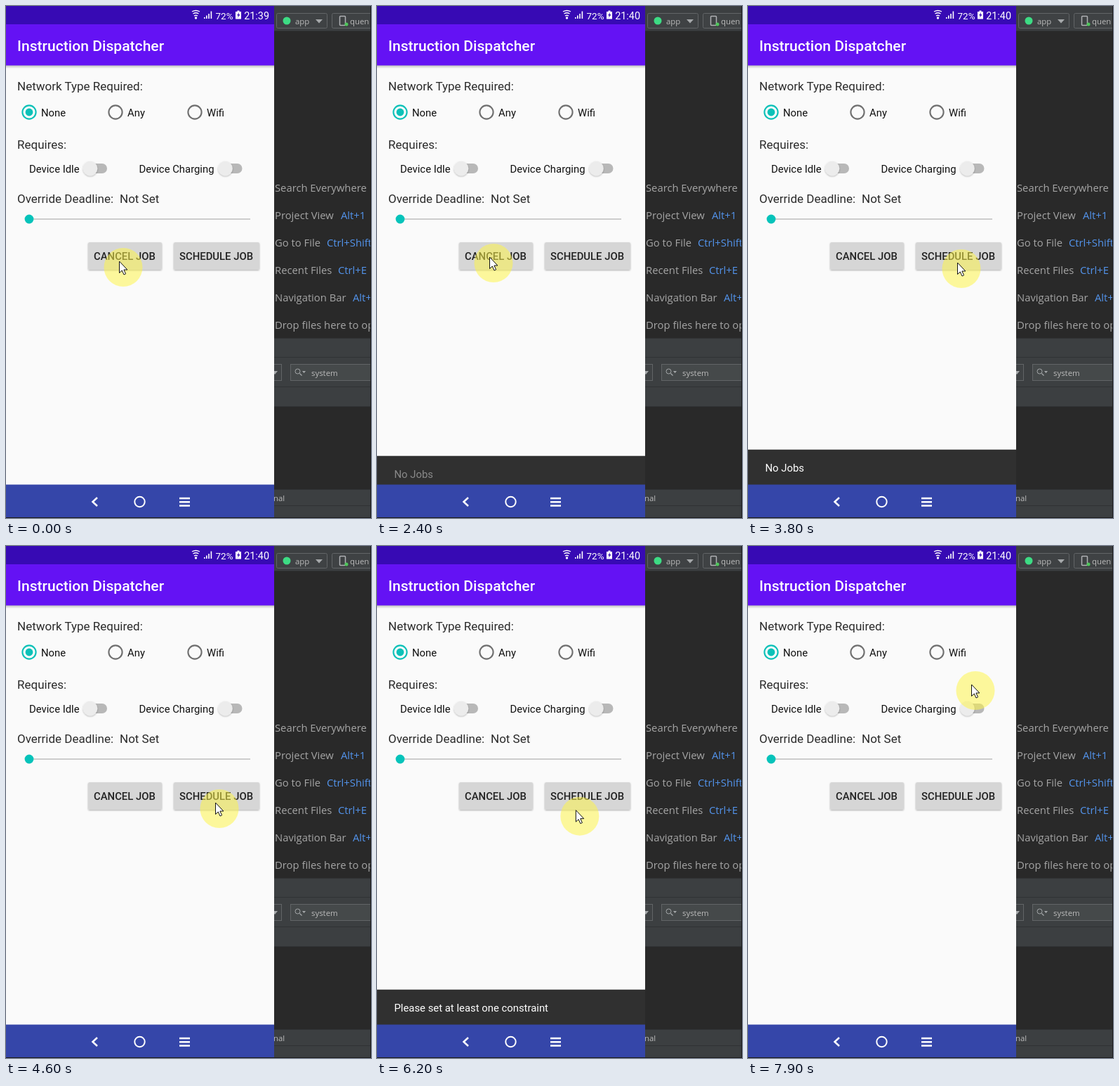
Recreate the animation shown at these times as an HTML page. Size 520x728 px, loop 8 s.

```html
<!DOCTYPE html>
<html lang="en">
<head>
<meta charset="utf-8">
<title>Job scheduling demo</title>
<style>
  html, body { margin: 0; width: 100%; height: 100%; overflow: hidden; background: #3c3f41; }
  svg { display: block; width: 520px; height: 728px; font-family: Roboto, sans-serif; }
  .ide { font: 14.8px "Open Sans", sans-serif; fill: #a5a5a5; }
  .key { fill: #5394ec; }
  .small { font-size: 11.4px; fill: #bbb; }
  .head { font-size: 17px; fill: #2b2b2b; }
  .label { font-size: 14.86px; fill: #111; }
  .button { font-size: 14.86px; font-weight: 500; fill: #222; }
  .line { fill: none; stroke: #fff; stroke-width: 2; }
</style>
</head>
<body>
<svg viewBox="0 0 520 728">
  <defs>
    <linearGradient id="fade" x2="0" y2="1">
      <stop stop-opacity=".25"/><stop offset="1" stop-opacity="0"/>
    </linearGradient>
    <filter id="lift" x="-20%" y="-20%" width="140%" height="150%">
      <feDropShadow dx="0" dy="1" stdDeviation="1" flood-opacity=".3"/>
    </filter>
    <clipPath id="screen"><rect width="382" height="728"/></clipPath>
    <g id="switch">
      <rect x="-6" y="-7" width="30" height="14" rx="7" fill="#b8b8b8"/>
      <circle r="10.3" fill="#ececec" filter="url(#lift)"/>
    </g>
  </defs>

  <!-- desktop behind the phone -->
  <g class="ide">
    <path d="M382 0h138v728H382z" fill="#3c3f41"/>
    <path d="M382 36h138v436H382zM382 570h138v117H382z" fill="#292929"/>
    <path d="M382 35.5h138M382 472.5h138M382 499.5h138M382 541.5h138M382 569.5h138M382 687.5h138M382 710.5h138"
          stroke="#303234"/>
    <g stroke="#626567">
      <rect x="385.5" y="10.5" width="72" height="21" rx="2" fill="#3f4244"/>
      <rect x="464.5" y="10.5" width="70" height="21" rx="2" fill="#3f4244"/>
      <rect x="370.5" y="509.5" width="22" height="23" fill="#3f4244"/>
      <rect x="405.5" y="509.5" width="130" height="23" fill="#45494a"/>
    </g>
    <circle cx="400" cy="21" r="5.5" fill="#3ddc84"/>
    <path d="M441 19h10l-5 5.5zM379 519h8l-4 5zM422 519h5l-2.5 3z" fill="#a5a8aa"/>
    <rect x="475.5" y="14.5" width="8" height="13" rx="1" fill="none" stroke="#afb1b3" stroke-width="1.5"/>
    <circle cx="485" cy="26" r="2.5" fill="#4fc65b"/>
    <path d="M418.5 522.5l3 3" stroke="#a5a8aa" stroke-width="1.3"/>
    <circle cx="415.5" cy="519.5" r="3.5" fill="none" stroke="#a5a8aa"/>
    <text x="412" y="26" class="small">app</text>
    <text x="490" y="26" class="small">quen</text>
    <text x="435" y="526" class="small">system</text>
    <text x="381" y="704" class="small">nal</text>
    <text x="383" y="264">Search Everywhere</text>
    <text x="383" y="303">Project View</text><text x="477" y="303" class="key">Alt+1</text>
    <text x="383" y="342">Go to File</text><text x="457" y="342" class="key">Ctrl+Shift+N</text>
    <text x="383" y="381">Recent Files</text><text x="473" y="381" class="key">Ctrl+E</text>
    <text x="383" y="420">Navigation Bar</text><text x="494" y="420" class="key">Alt+Home</text>
    <text x="383" y="459">Drop files here to open</text>
    <path d="M519.5 0v728" stroke="#1a1a1a"/>
  </g>

  <!-- phone -->
  <g clip-path="url(#screen)">
    <path d="M0 0h382v728H0z" fill="#fafafa"/>
    <path d="M0 84h382v5H0z" fill="url(#fade)"/>
    <path d="M0 25h382v59.5H0z" fill="#6412f4"/>
    <path d="M0 0h382v26H0z" fill="#370ab4"/>
    <g fill="#fff">
      <text x="16" y="63.5" font-size="21.1" font-weight="500">Instruction Dispatcher</text>
      <text x="298.5" y="18.5" font-size="13.5">72%</text>
      <text id="clock" x="375" y="18.5" font-size="14.4" text-anchor="end"></text>
      <path d="M282 16h1.6v2H282zM285 13.5h1.6V18H285zM288.2 11h1.6v7h-1.6zM291.6 7.5h1.6V18h-1.6z"/>
      <path d="M329.500 6.500h3V8h2.500v10.500h-8V8h2.500z"/>
      <path d="M332 9l-3 4.500h2l-1 3.500 3.500-5h-2z" fill="#370ab4"/>
      <circle cx="270.500" cy="17" r="1.700"/>
    </g>
    <path d="M265 8q5.500-3 11 0M266.500 11q4-2.500 8 0M268 14q2.500-1.500 5 0" class="line" style="stroke-width:1.4"/>

    <g class="head">
      <text x="16" y="120">Network Type Required:</text>
      <text x="16" y="203">Requires:</text>
      <text x="16" y="280">Override Deadline:</text>
      <text x="162" y="280">Not Set</text>
    </g>
    <g class="label">
      <text x="50" y="156.5">None</text>
      <text x="173" y="156.5">Any</text>
      <text x="286" y="156.5">Wifi</text>
      <text x="33" y="236.5">Device Idle</text>
      <text x="189.5" y="236.5">Device Charging</text>
    </g>
    <g fill="none" stroke="#707070" stroke-width="2.1">
      <circle cx="33" cy="151" r="9.6" stroke="#0bc1b8"/>
      <circle cx="156" cy="151" r="9.6"/>
      <circle cx="269" cy="151" r="9.6"/>
    </g>
    <circle cx="33" cy="151" r="5.4" fill="#0bc1b8"/>
    <use href="#switch" x="120" y="231"/>
    <use href="#switch" x="312.5" y="231"/>
    <path d="M33 303h315" stroke="#cdcdcd" stroke-width="2"/>
    <circle cx="33" cy="303" r="6.4" fill="#05c3ba"/>

    <g filter="url(#lift)">
      <rect id="cancel" x="117" y="336" width="105" height="39" rx="2"/>
      <rect id="schedule" x="239" y="336" width="122" height="39" rx="2"/>
    </g>
    <text x="125" y="361" class="button">CANCEL JOB</text>
    <text x="247" y="361" class="button">SCHEDULE JOB</text>

    <g id="snackbar">
      <path d="M0 630h382v1H0z" fill="#c4c4c4"/>
      <path d="M0 631h382v51H0z" fill="#303030"/>
      <text id="message" x="24.5" y="662" font-size="14.86" fill="#fff"></text>
    </g>

    <path d="M0 680.5h382V728H0z" fill="#3546a9"/>
    <path d="M130 699l-6.5 6 6.5 6M247 700h15M247 705.2h15M247 710.4h15" class="line" style="stroke-width:2.5"/>
    <circle cx="190.5" cy="705" r="7.2" class="line"/>
  </g>
  <path d="M0 727.5h520" stroke="#1a1a1a"/>

  <g id="cursor">
    <circle cx="5.5" cy="8.5" r="27.5" fill="#fff545" fill-opacity=".52"/>
    <path d="M0 0v16.5l3.8-3.5 2.7 6 2.6-1.2-2.7-5.8h5z" fill="#fff" stroke="#111"/>
  </g>
</svg>
<script>
const LOOP = 8000, STEP = 100, SLIDE = 250, SHOWN = 1750;
const el = id => document.getElementById(id);
const clamp = v => Math.min(1, Math.max(0, v));

const snacks = [
  { at: 593, text: 'No Jobs' },
  { at: 2593, text: 'No Jobs' },
  { at: 5645, text: 'Please set at least one constraint' }
];

// time, x, y of the pointer tip
const path = [
  [0, 161.5, 363], [500, 161.5, 363], [1000, 160.5, 357], [2700, 160.5, 357],
  [3600, 298.5, 365], [5000, 298.5, 365], [5500, 293.5, 362], [6150, 293.5, 362],
  [6550, 57, 680], [6800, 181.5, 644], [7050, 230, 678], [7600, 356, 139],
  [7900, 318.5, 197], [8000, 318.5, 197]
];

// Material standard curve: cubic-bezier(.4, 0, .2, 1)
function standard(x) {
  let lo = 0, hi = 1, s;
  for (let i = 0; i < 20; i++) {
    s = (lo + hi) / 2;
    const px = 1.2 * (1 - s) ** 2 * s + .6 * (1 - s) * s * s + s ** 3;
    if (px < x) lo = s; else hi = s;
  }
  return s * s * (3 - 2 * s);
}

function pointer(t) {
  const i = path.findIndex(p => p[0] > t);
  const [t0, x0, y0] = path[i - 1], [t1, x1, y1] = path[i];
  const u = (t - t0) / (t1 - t0), k = u * u * (3 - 2 * u);
  return [x0 + (x1 - x0) * k, y0 + (y1 - y0) * k];
}

const buttonFill = (t, ...presses) =>
  presses.some(p => t >= p && t < p + 250) ? '#c5c5c5' : '#d6d6d6';

function draw(t) {
  el('clock').textContent = t < 100 ? '21:39' : '21:40';
  el('cancel').setAttribute('fill', buttonFill(t, 500, 2100));
  el('schedule').setAttribute('fill', buttonFill(t, 5600));

  const snack = snacks.find(s => t >= s.at && t < s.at + SHOWN + SLIDE);
  el('snackbar').style.display = snack ? '' : 'none';
  if (snack) {
    const age = t - snack.at, leaving = age - SHOWN;
    const open = leaving < 0 ? standard(clamp(age / SLIDE)) : 1 - standard(leaving / SLIDE);
    const alpha = leaving < 0 ? clamp((age - 70) / 180) : clamp(1 - leaving / 100);
    el('snackbar').setAttribute('transform', `translate(0 ${Math.round((1 - open) * 50)})`);
    el('message').textContent = snack.text;
    el('message').setAttribute('opacity', alpha);
  }
  el('cursor').setAttribute('transform', `translate(${pointer(t)})`);
}

const start = performance.now();
function tick() {
  const t = (performance.now() - start) % LOOP;
  draw(Math.floor(t / STEP) * STEP);
  requestAnimationFrame(tick);
}
tick();
</script>
</body>
</html>
```
